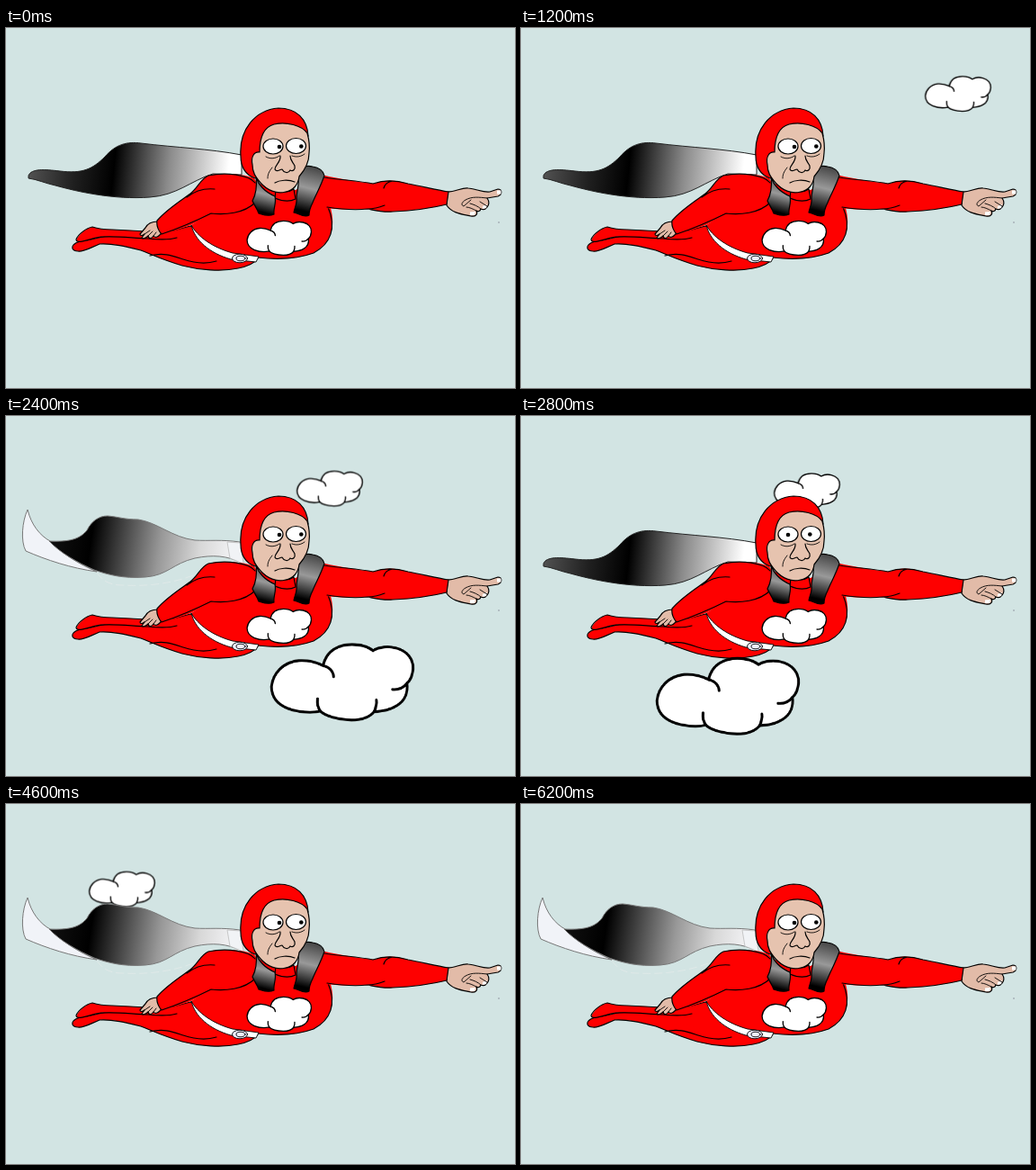
Recreate the animation shown at these times as an HTML page. Size 566 by 400 pixels, loop 6400 ms.

```html
<!DOCTYPE html>
<html lang="en">
<head>
<meta charset="utf-8">
<title>Flying hero</title>
<style>
html, body { margin: 0; width: 100%; height: 100%; overflow: hidden; background: #d2e4e3; }
svg { display: block; width: 100%; height: 100%; }

.ink { fill: none; stroke: #000; stroke-width: 1.2; stroke-linecap: round; stroke-linejoin: round; }
.red { fill: #fe0000; }
.skin { fill: #e2bba8; }
.face { fill: #e6c3af; }
.white { fill: #fff; }
.strap { fill: url(#strap); }
.thin { stroke-width: .9; }

/* the cape flaps out about every 1.4 s */
.capeA { animation: flapA 6.4s step-end infinite; }
.capeB { animation: flapB 6.4s step-end infinite; }
@keyframes flapA {
  0%, 18.75%, 40.625%, 62.5%, 84.375% { opacity: 1; }
  6.25%, 28.125%, 50%, 71.875%, 93.75%, 100% { opacity: 0; }
}
@keyframes flapB {
  0%, 18.75%, 40.625%, 62.5%, 84.375% { opacity: 0; }
  6.25%, 28.125%, 50%, 71.875%, 93.75%, 100% { opacity: 1; }
}

.drift { animation: drift 6.4s steps(32) infinite; }
@keyframes drift {
  from { transform: translate(575px, 45.2px) scale(.285); }
  to { transform: translate(-97px, 85.8px) scale(.285); }
}

.pass { animation: pass 6.4s step-end infinite; }
@keyframes pass {
  0% { transform: translate(600px, 200px); }
  3.125% { transform: translate(382px, 210px); }
  6.25% { transform: translate(262px, 223px); }
  9.375% { transform: translate(142px, 236px); }
  12.5% { transform: translate(22px, 249px); }
  15.625% { transform: translate(600px, 200px); }
  31.25% { transform: translate(470px, 237px) scale(.617); }
  34.375% { transform: translate(380px, 245px) scale(.617); }
  37.5% { transform: translate(294px, 252px) scale(.617); }
  40.625% { transform: translate(222px, 260px) scale(.617); }
  43.75% { transform: translate(150px, 267.5px) scale(.617); }
  46.875% { transform: translate(70px, 269px) scale(.617); }
  50% { transform: translate(-15px, 269px) scale(.617); }
  53.125% { transform: translate(-100px, 269px) scale(.617); }
  56.25%, 100% { transform: translate(600px, 200px); }
}

.pupils { animation: look 6.4s step-end infinite; }
@keyframes look {
  0%, 65.625%, 96.875%, 100% { transform: none; }
  40.625%, 87.5% { transform: translate(-7px, 0); }
}
.smile { animation: smile 6.4s step-end infinite; }
.frown { animation: frown 6.4s step-end infinite; }
@keyframes smile {
  0%, 65.625%, 96.875%, 100% { opacity: 0; }
  50%, 87.5% { opacity: 1; }
}
@keyframes frown {
  0%, 65.625%, 96.875%, 100% { opacity: 1; }
  50%, 87.5% { opacity: 0; }
}
</style>
</head>
<body>
<svg viewBox="0 0 566 400">
  <defs>
    <linearGradient id="capeA" gradientUnits="userSpaceOnUse" x1="28" y1="150" x2="246" y2="172">
      <stop offset="0" stop-color="#505050"/><stop offset=".22" stop-color="#202020"/>
      <stop offset=".42" stop-color="#000"/><stop offset=".7" stop-color="#8c8c8c"/>
      <stop offset="1" stop-color="#fff"/>
    </linearGradient>
    <linearGradient id="capeB" gradientUnits="userSpaceOnUse" x1="50" y1="135" x2="250" y2="165">
      <stop offset="0" stop-color="#101010"/><stop offset=".22" stop-color="#000"/>
      <stop offset=".6" stop-color="#989898"/><stop offset=".82" stop-color="#d8d8d8"/>
      <stop offset="1" stop-color="#f2f2f4"/>
    </linearGradient>
    <linearGradient id="strap" x1=".6" y1="0" x2=".45" y2="1">
      <stop offset="0" stop-color="#444"/><stop offset=".45" stop-color="#999"/>
      <stop offset=".92" stop-color="#000"/>
    </linearGradient>
    <g id="cloud" transform="translate(-141 -236)" stroke="#000" stroke-width="4.8" stroke-linecap="round">
      <path fill="#fff" d="M236 277C242 249 265 239 288 239C304 239 317 243 326 250C337 243 354 242 366 245C388 250 399 266 398 283C397 296 393 304 387 309C389 325 384 340 369 349C356 357 344 359 328 360C319 371 304 375 287 375C262 374 240 368 231 359C215 363 190 361 172 354C152 346 143 332 143 315C145 292 163 271 192 268C207 267 222 270 236 277Z"/>
      <path fill="none" d="M236 277C247 280 254 287 255 297M387 309C380 318 372 321 361 320M328 360C331 353 333 346 332 339M231 359C226 352 225 345 226 337"/>
    </g>
  </defs>

  <rect width="566" height="400" fill="#d2e4e3"/>
  <use href="#cloud" class="drift"/>

  <!-- cape, two poses -->
  <g class="capeA">
    <path fill="url(#capeA)" stroke="#222" d="M25 164C28 156 43 157 60 159C85 162 96 157 110 143C122 129 135 126 150 128C190 133 225 134 262 141L262 163L230 162C205 170 190 186 160 188C120 191 80 182 55 175C45 173 34 168 25 167Z"/>
  </g>
  <g class="capeB">
    <path fill="none" stroke="#dfe9e8" stroke-dasharray="9 4" d="M101 174C108 184 116 188 130 188C165 190 200 184 232 166"/>
    <path fill="#f1f3f8" stroke="#777" d="M24 104C28 121 38 133 49 139C62 153 82 165 101 173C72 169 45 160 22 150C16 139 18 117 24 104Z"/>
    <path fill="url(#capeB)" stroke="#777" d="M48 139C70 140 82 137 90 127C95 117 103 111 113 111C125 112 132 115 147 115C168 118 185 135 210 138C225 139 240 137 260 140L262 163C245 155 230 154 210 158C185 164 180 177 155 179C130 181 112 176 98 171C80 163 60 152 48 139Z"/>
    <path fill="#f1f3f6" stroke="#bbb" stroke-width=".8" d="M246 140L261 141L264 164L249 158Z"/>
  </g>

  <!-- legs and torso -->
  <path class="ink red" d="M74 245C73 240 79 237 90 236L112 231L160 232L205 220L280 256C276 262 268 265 258 267C240 271 215 269 196 264C178 259 165 253 150 247C134 243 118 239 104 240C94 244 86 249 80 248C77 248 75 247 74 245Z"/>
  <path class="red" d="M78 237C80 229 90 222 96 221C102 223 108 224 118 224L165 226L205 226L200 250L150 236C130 233 110 230 100 233C92 236 84 239 78 237Z"/>
  <path class="ink" d="M156 226L118 224C108 224 102 223 96 221C90 222 80 229 78 235C78 240 90 236 100 233C112 230 135 233 158 234C168 235 180 236 190 233M160 253C175 249 185 253 197 257C212 262 224 262 234 259"/>
  <path class="red" d="M206 219L225 208L262 203L275 170L300 180L322 180L350 165L361 200C367 222 361 239 342 250C320 258 298 257 280 255L250 253C228 248 213 234 206 219Z"/>
  <path class="ink" d="M358 199C368 222 361 240 342 250C320 258 298 257 280 255"/>
  <path class="ink white thin" d="M206 219C213 232 230 244 252 250L281 254L278 260L250 257C226 250 210 236 206 219Z"/>
  <ellipse class="ink thin" style="fill:#eef" cx="260" cy="256" rx="8.500" ry="4.800"/>
  <ellipse class="ink thin" cx="261" cy="256" rx="5" ry="2.800"/>

  <!-- near arm -->
  <path class="ink skin" d="M169 215C162 215 157 218 155 222L149 229C149 231 152 231 154 229L151 233C152 235 156 233 158 231C159 235 162 234 164 231C166 234 169 232 172 229L174 222Z"/>
  <path class="ink thin" d="M154 229L160 225M158 231L163 226M164 231L167 227"/>
  <path class="red" d="M276 167C262 161 235 161 225 164C216 168 214 177 205 184C194 192 178 202 168 214C167 220 170 226 173 229C194 224 212 217 226 209C240 206 260 208 275 196L290 190Z"/>
  <path class="ink" d="M277 172C270 163 245 160 225 164C216 168 214 177 205 184C194 192 178 202 168 214C167 220 170 226 173 229C194 222 212 214 228 206C243 208 265 206 277 194M201 188C210 181 222 178 232 179"/>

  <!-- pointing arm -->
  <path class="ink skin" d="M491 182C500 182 507 177 514 178C524 179 530 183 538 182L547 179C552 179 552 185 547 187L535 189C538 193 537 197 535 199C533 202 530 202 528 201C527 204 525 204 523 203C525 207 522 210 517 209C508 207 496 206 490 197Z"/>
  <path class="white" d="M546 180.500H550.500V184.500H546ZM516 204.500L522 204L521 208L516 208ZM530 198L535 196L534 200L530 201Z"/>
  <path class="ink thin" d="M535 189C526 188 518 187 511 191C506 194 506 197 509 198L517 191M528 201C525 198 520 196 516 195M523 203C519 201 515 199 512 199M535 198L527 193"/>
  <path class="red" d="M345 162C365 166 388 171 410 173C422 168 434 169 447 173C463 176 479 180 492 182L490 196C474 200 452 203 430 204C419 205 412 203 402 201C385 203 370 201 350 200Z"/>
  <path class="ink" d="M354 166C375 169 393 170 408 173C422 168 434 169 447 173C463 176 479 180 492 182L490 196C474 200 452 203 430 204C419 205 412 203 402 201C385 203 370 201 357 199M430 170C424 171 421 174 420 178M402 201C410 201 416 199 421 197"/>
  <circle cx="548" cy="216" r=".7" fill="#778"/>

  <use href="#cloud" transform="translate(267.500 213.500) scale(.28)"/>

  <!-- collar and straps -->
  <path class="ink red" d="M300 180C305 183 314 183 320 179L322 190C314 194 306 192 299 189Z"/>
  <path class="ink strap" d="M278 165C281 176 288 182 299 187C301 194 297 201 298 207C291 210 285 207 281 206C279 200 276 197 274 192C278 185 279 174 278 165Z"/>
  <path class="ink strap" d="M323 162C326 155 333 152 341 154C348 155 353 159 354 164C350 176 344 186 341 194C338 200 337 205 337 208C331 211 326 206 320 205C321 199 324 195 323 189C323 181 328 171 323 162Z"/>

  <!-- head -->
  <path class="ink red" d="M277 167C266 163 261 155 261 142C259 113 277 91 303 89C323 89 335 101 336 120L310 150Z"/>
  <path class="ink face" d="M335 117C329 108 312 104 298 107C287 110 282 121 282 138C276 137 272 143 274 152C274 160 277 165 283 172C290 180 301 185 311 182C319 181 325 174 326 165C333 157 337 149 337 139C338 131 337 124 335 117Z"/>
  <path class="ink thin" d="M289 143C294 146 300 145 304 142M318 142C323 144 328 143 332 140M296 155C292 160 291 163 291 167"/>
  <ellipse class="ink white" cx="297" cy="131.500" rx="11" ry="8.500"/>
  <ellipse class="ink white" cx="322.500" cy="131" rx="11" ry="8.500"/>
  <g class="pupils">
    <circle cx="304" cy="132" r="2.300"/><circle cx="328.300" cy="131.500" r="2.300"/>
  </g>
  <path class="ink" d="M305 142C306 149 299 152 299 157C301 161 304 157 307 157C309 161 314 162 316 158C319 160 322 157 321 153C319 149 316 147 316 142"/>
  <path class="ink frown" d="M299 172C304 169 314 168 321 171"/>
  <g class="smile">
    <path class="ink white" d="M293 165C302 170 314 169 322 163C321 172 316 179 308 179C301 178 295 172 293 165Z"/>
    <path class="ink thin" d="M291 167L295 163M320 161L324 164"/>
  </g>

  <use href="#cloud" class="pass"/>
</svg>
</body>
</html>
```
